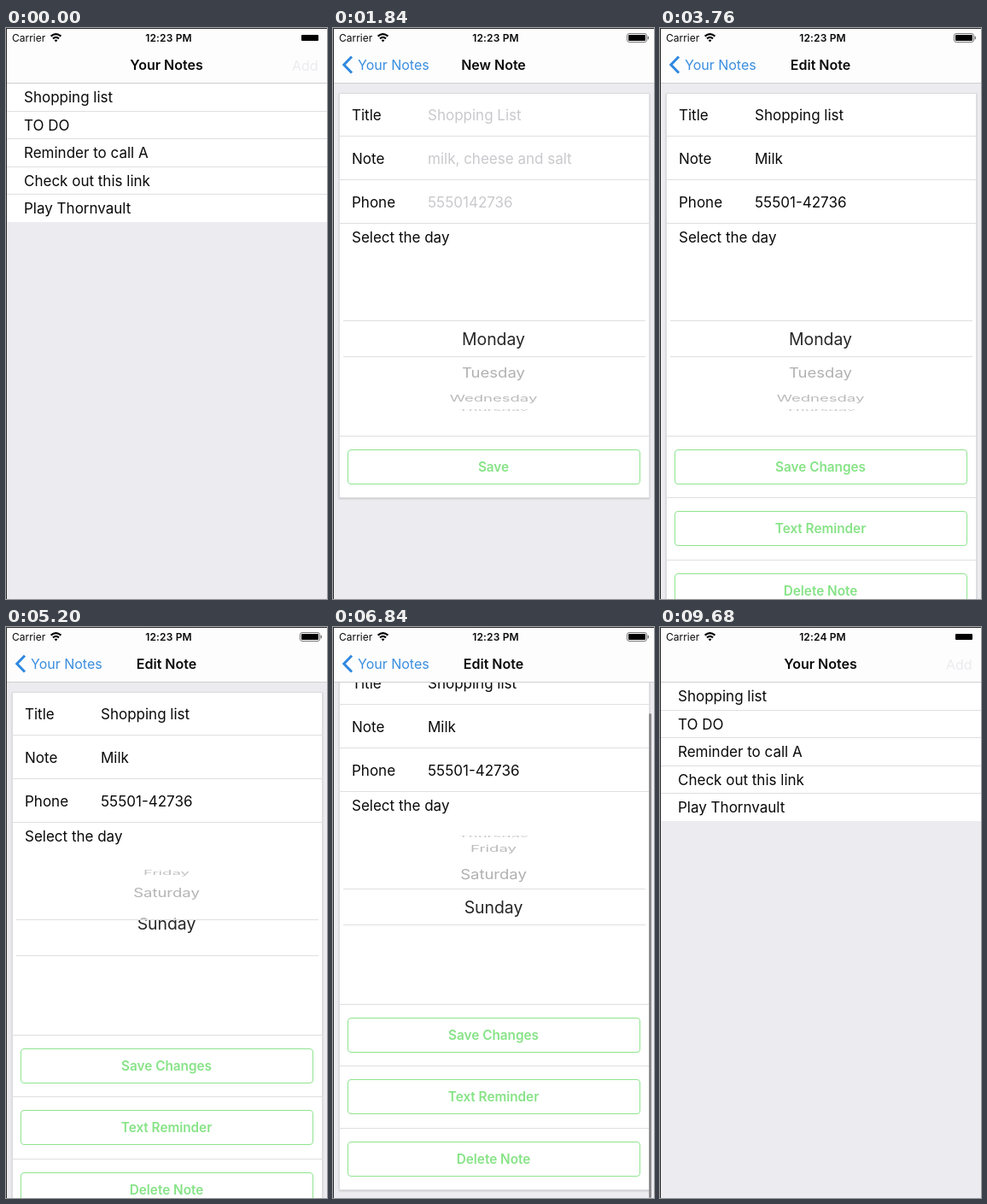
Recreate the animation shown at these times as an HTML page. Size 376 by 668 pixels, loop 9720 ms.

```html
<!DOCTYPE html>
<html lang="en">
<head>
<meta charset="utf-8">
<title>Notes app</title>
<style>
html, body { margin: 0; width: 100%; height: 100%; overflow: hidden; }
#stage {
  position: relative; width: 376px; height: 668px; overflow: hidden; background: #000;
  font: 17px/24px Inter, "Open Sans", sans-serif; color: #0a0a0a; white-space: nowrap;
}
#stage div { position: absolute; box-sizing: border-box; }
#stage .page { inset: 0; background: #ebebf0; overflow: hidden; }
#stage .over { box-shadow: 0 0 5px rgba(0, 0, 0, .14); }
#stage .layer { inset: 0; }
#stage .row { left: 0; width: 376px; height: 32.5px; background: #fff; border-top: 1px solid #dfdfe4; }
#stage .card {
  left: 6.5px; width: 364px; top: 75.5px; background: #fff;
  border: 1px solid #dcdcde; box-shadow: 0 1px 2px rgba(0, 0, 0, .16);
}
#stage .line { height: 1px; background: #dfdfe1; }
#stage .btn {
  left: 17px; width: 343px; height: 41px; border: 1px solid #8fe48f; border-radius: 4px;
}
#stage .mid { left: 0; width: 376px; text-align: center; }
#stage .strong { font-weight: 600; font-size: 16px; }
#stage .act { font-weight: 600; font-size: 15.3px; color: #86e386; }
#stage .hint { color: #c9c9cd; }
#stage .blue { color: #3b8edf; font-size: 16px; }
#stage .small { font-size: 12px; }
#stage .win { left: 0; width: 376px; overflow: hidden; }
#stage .bar { left: 370px; width: 2.5px; border-radius: 2px; background: #8d8d90; }
#stage .head { left: 0; top: 0; width: 376px; height: 65px; background: #fdfdfd; border-bottom: 1px solid #cfcfd2; }
#stage .edge { inset: 0; border-left: 1px solid #2a2a2a; border-top: 1px solid #2a2a2a; }
svg { position: absolute; left: 0; top: 0; }
</style>
</head>
<body>
<div id="stage"></div>
<script>
const LOOP = 9720, W = 376, SLIDE = 500;
const DAYS = ["Monday", "Tuesday", "Wednesday", "Thursday", "Friday", "Saturday", "Sunday"];
const WHEEL = { y: 364, radius: 83.6, step: 27.8 * Math.PI / 180 };
const stage = document.getElementById("stage");

function box(parent, cls, style = {}, text = "") {
  const el = document.createElement("div");
  el.className = cls;
  el.textContent = text;
  for (const k in style) el.style[k] = typeof style[k] === "number" ? style[k] + "px" : style[k];
  parent.append(el);
  return el;
}
// Text whose capitals are centred on y.
const label = (parent, text, x, y, cls = "") => box(parent, cls, { left: x, top: y - 12 }, text);
const middle = (parent, text, y, cls) => box(parent, "mid " + cls, { top: y - 12 }, text);
const rule = (parent, y, x = 7, w = 363) => box(parent, "line", { left: x, top: y, width: w });

function art(parent, body) {
  const holder = box(parent, "layer");
  holder.innerHTML = `<svg width="376" height="66" fill="none">${body}</svg>`;
  return holder;
}

function listPage() {
  const page = box(stage, "page");
  ["Shopping list", "TO DO", "Reminder to call A", "Check out this link", "Play Thornvault"].forEach((name, i) => {
    const y = 64 + i * 32.5;
    box(page, "row", { top: y });
    label(page, name, 21, y + 17.2);
  });
  return page;
}

function wheel(parent) {
  const top = WHEEL.y - 21.5, bottom = WHEEL.y + 20.5;
  const items = [];
  const part = (y, h, color, size) => {
    const win = box(parent, "win", { top: y, height: h });
    DAYS.forEach((day, i) => {
      const el = box(win, "mid", { top: WHEEL.y - 12 - y, color, fontSize: size }, day);
      items.push({ el, i, dim: color !== "#262626" });
    });
  };
  part(275, top - 275, "#999", 18.5);
  part(top, bottom - top, "#262626", 19.4);
  part(bottom, 451 - bottom, "#999", 18.5);
  rule(parent, 342, 12, 354);
  rule(parent, 384, 12, 354);
  return pos => items.forEach(({ el, i, dim }) => {
    const a = (i - pos) * WHEEL.step, c = Math.cos(a);
    const visible = Math.abs(a) < Math.PI / 2;
    el.style.display = visible ? "block" : "none";
    if (!visible) return;
    el.style.transform = `translateY(${WHEEL.radius * Math.sin(a)}px) scaleY(${c})`;
    el.style.opacity = dim ? .5 + .3 * c : 1;
  });
}

function notePage(fields, buttons, cls) {
  const page = box(stage, "page over");
  const body = box(page, "layer");
  box(body, "card", { height: 402 + 72.5 * buttons.length });
  ["Title", "Note", "Phone"].forEach((name, i) => {
    label(body, name, 22, 102 + 51 * i);
    label(body, fields[i], 111, 102 + 51 * i - .5, cls);
    rule(body, 126 + 51 * i);
  });
  label(body, "Select the day", 22, 245);
  const turn = wheel(body);
  buttons.forEach((name, i) => {
    const y = 476.5 + 72.5 * i;
    rule(body, y);
    box(body, "btn", { top: y + 16 });
    middle(body, name, y + 37, "act");
  });
  const bar = box(page, "bar");
  return { page, body, turn, bar };
}

const list = listPage();
const fresh = notePage(["Shopping List", "milk, cheese and salt", "5550142736"], ["Save"], "hint");
const edit = notePage(["Shopping list", "Milk", "55501-42736"],
  ["Save Changes", "Text Reminder", "Delete Note"], "");
fresh.turn(0);

const head = box(stage, "head");
const home = middle(head, "Your Notes", 43, "strong");
fresh.title = middle(head, "New Note", 43, "strong");
edit.title = middle(head, "Edit Note", 43, "strong");
const add = label(head, "Add", 335, 43.5, "blue");
const arrow = art(head, '<path d="M22 33.5L12.8 43L22 52.5" stroke="#2f88e0" stroke-width="3"/>');
const back = label(head, "Your Notes", 29, 43, "blue");
label(head, "Carrier", 7, 11.5, "small");
const clock = middle(head, "", 11.5, "small");
clock.style.cssText += "left:2.5px;font-weight:600;letter-spacing:.15px";
art(head, `<g stroke="#000" stroke-width="2.2"><path d="M52.6 9.6Q58.5 4.6 64.4 9.6"/>
  <path d="M55 12.4Q58.5 9.4 62 12.4"/></g><path d="M56.6 14.3Q58.5 12.8 60.4 14.3L58.5 16.6Z" fill="#000"/>
  <rect x="346" y="8" width="20" height="7" rx="1" fill="#000"/>`);
const shell = art(head, `<rect x="344.5" y="6.5" width="23" height="10" rx="2.5" stroke="#777"/>
  <path d="M369.3 9.8V13.2" stroke="#777" stroke-width="1.4"/>`);
box(stage, "edge");

const clamp = v => Math.min(1, Math.max(0, v));
const easeOut = u => 1 - (1 - u) ** 3;
const easeBoth = u => u * u * (3 - 2 * u);

// Slide curve: cubic-bezier(.2833, .99, .31833, .99).
function slide(u) {
  if (u <= 0) return 0;
  if (u >= 1) return 1;
  const curve = (s, a, b) => 3 * (1 - s) ** 2 * s * a + 3 * (1 - s) * s * s * b + s ** 3;
  let lo = 0, hi = 1;
  for (let i = 0; i < 24; i++) {
    const s = (lo + hi) / 2;
    if (curve(s, .2833, .31833) < u) lo = s; else hi = s;
  }
  return curve(lo, .99, .99);
}
const shown = (t, open, close) =>
  t < close ? slide((t - open) / SLIDE) : 1 - slide((t - close) / SLIDE);

// Steps are [time, value, easing towards it].
function track(steps, t) {
  if (t <= steps[0][0]) return steps[0][1];
  for (let i = 1; i < steps.length; i++) {
    const [t0, a] = steps[i - 1], [t1, b, ease = u => u] = steps[i];
    if (t < t1) return a + (b - a) * ease((t - t0) / (t1 - t0));
  }
  return steps[steps.length - 1][1];
}
const SPIN = [[4580, 0], [4720, .7], [4900, 3], [5080, 5.7], [5200, 6.42, easeOut], [5300, 6.4], [5800, 6, easeBoth]];
const SCROLL = [[5940, 0], [6280, 88, easeOut], [6440, 88], [6780, 36, easeOut], [6860, 36], [7240, 0, easeOut]];
const BAR = [[5940, 0], [6000, 1], [7260, 1], [7480, 0]];

function place(note, p) {
  note.page.style.display = p > 0 ? "block" : "none";
  note.page.style.transform = `translateX(${W * (1 - p)}px)`;
  note.title.style.transform = `translateX(${200 * (1 - p)}px)`;
  note.title.style.opacity = p;
}

function scrollTo(y, alpha) {
  const max = 36, view = 603, full = 567;
  const over = Math.max(0, y - max), len = full - over;
  edit.body.style.transform = `translateY(${-y}px)`;
  edit.bar.style.top = 65 + (view - len) * clamp(y / max) + "px";
  edit.bar.style.height = len + "px";
  edit.bar.style.opacity = alpha;
}

function draw(t) {
  const a = shown(t, 973, 2030), b = shown(t, 2973, 8265), p = Math.max(a, b);
  place(fresh, a);
  place(edit, b);
  edit.turn(track(SPIN, t));
  scrollTo(track(SCROLL, t), track(BAR, t));
  list.style.transform = `translateX(${-.3 * W * p}px)`;
  list.style.opacity = 1 - .13 * p;
  home.style.transform = `translateX(${-200 * p}px)`;
  home.style.opacity = 1 - p;
  add.style.opacity = 1 - p;
  add.style.color = p > 0 ? "" : "#ebebf0";
  shell.style.opacity = p > 0 ? 1 : 0;
  arrow.style.opacity = back.style.opacity = clamp((p - .65) / .35);
  back.style.transform = `translateX(${93 * (1 - p)}px)`;
  clock.textContent = t < 6900 ? "12:23 PM" : "12:24 PM";
}

const start = performance.now();
function tick() {
  draw((performance.now() - start) % LOOP);
  requestAnimationFrame(tick);
}
tick();
</script>
</body>
</html>
```
